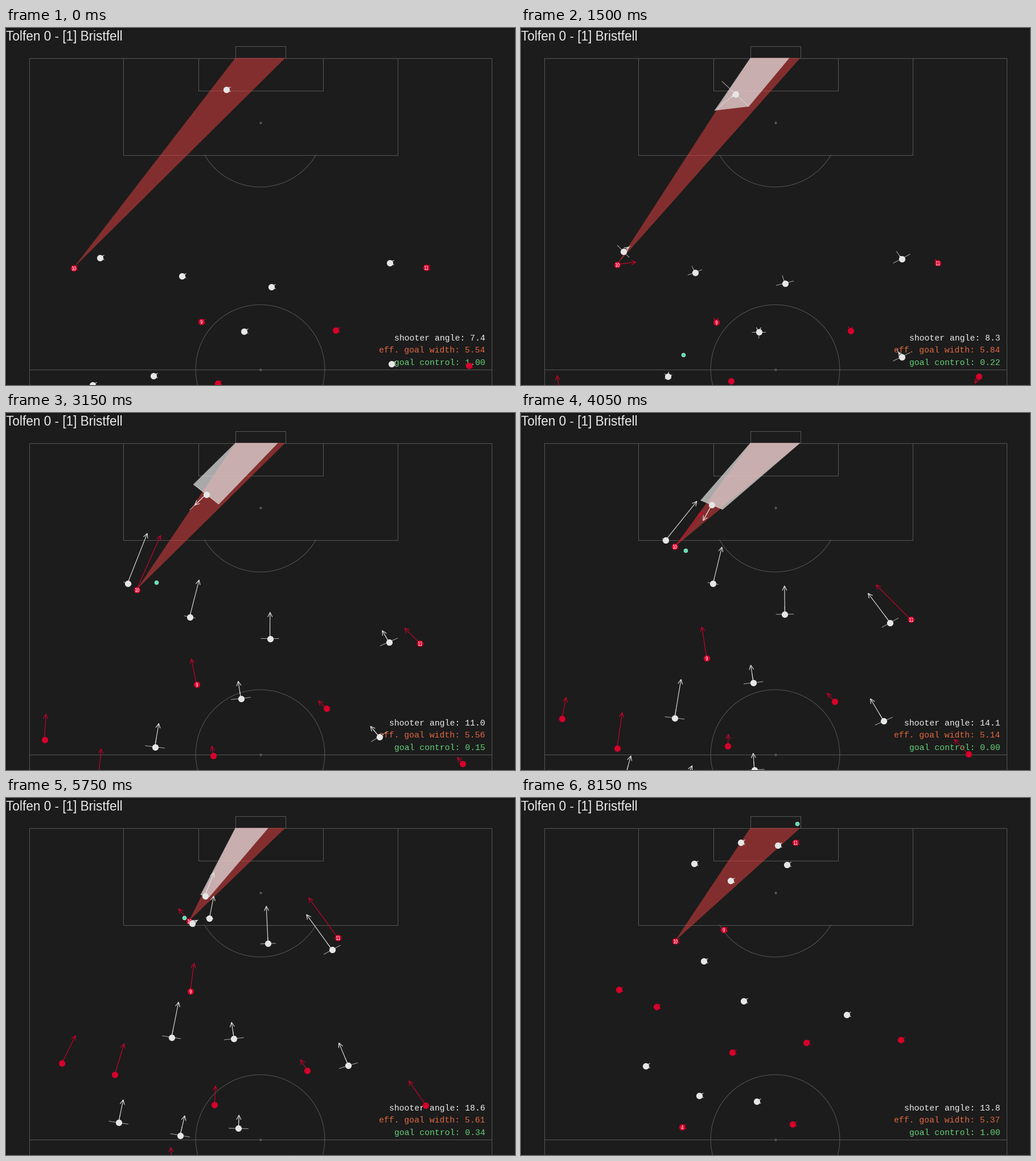
Animation, 894 px wide and 626 px high, one loop 8250 ms. Source, as a matplotlib script:

```python
from itertools import combinations

import numpy as np
import matplotlib.pyplot as plt
from matplotlib.animation import FuncAnimation
from matplotlib.collections import LineCollection, PolyCollection

W, H, DPI = 894, 626, 64
FRAMES, STEP = 165, 50
LAST = FRAMES - 2
SCALE = np.array([11.95, 10.35])      # pixels per metre, across and along
GOAL_Y, POST_L, POST_R = 53, 403.3, 491
BG, LINE = "#1c1c1c", "#565656"
RED, WHITE, BALL = "#d6002a", "#e6e6e6", "#50e3b4"

KICK = 1.5                            # the long pass; everyone drifts until then
RUN = (KICK, 3.15, 4.85, 8.15)
DUEL = (KICK, 3.15, 4.4, 4.85, 5.3, 5.75, 6.95, 8.15)


def px(n):
    return n * 72 / DPI


class Path:
    """Steady drift up to KICK, then a smooth spline through the points."""

    def __init__(self, *points, drift=(0, -1), times=RUN, label="", skill=1):
        self.p, self.t = np.array(points, float), np.array(times)
        self.drift, self.label, self.skill = np.array(drift), label, skill
        h = np.diff(self.t)
        d = np.diff(self.p, axis=0) / h[:, None]
        a, r = np.eye(len(times)), np.zeros_like(self.p)
        r[0] = -self.drift / KICK
        for k in range(1, len(h)):
            a[k, k - 1:k + 2] = h[k], 2 * (h[k - 1] + h[k]), h[k - 1]
            r[k] = 3 * (h[k] * d[k - 1] + h[k - 1] * d[k])
        a[-1, -2:] = 1, 2
        r[-1] = 3 * d[-1]
        self.m = np.linalg.solve(a, r)

    def at(self, t):
        if t < KICK:
            return self.p[0] + self.drift * (1 - t / KICK), self.m[0]
        k = min(np.searchsorted(self.t, t, side="right"), len(self.t) - 1) - 1
        h = self.t[k + 1] - self.t[k]
        u = (t - self.t[k]) / h
        p, q = self.p[k], self.p[k + 1]
        v, w = self.m[k] * h, self.m[k + 1] * h
        a, b = 2 * p - 2 * q + v + w, 3 * q - 3 * p - 2 * v - w
        return p + u * (v + u * (b + u * a)), (v + u * (2 * b + 3 * u * a)) / h


ball = Path((285, 573), (264, 297), (302, 233), (313, 226), (314, 221), (313, 210),
            (377, 131), (485, 45), drift=(20, 287), times=DUEL)
shooter = Path((169, 415), (230, 310), (288, 219), (310, 216), (324, 221), (322, 216),
               (286, 197), (271, 251), drift=(-50, 6), times=DUEL, label="10")
keeper = Path((377, 116), (352, 143), (331, 173), (327, 193), (324, 212), (327, 220),
              (329, 163), (304, 115), drift=(10, -8), times=DUEL, skill=2)
marker = Path((180, 392), (214, 299), (275, 204), (306, 192), (336, 187), (350, 172),
              (355, 122), (386, 78), drift=(-15, 11), times=DUEL)

whites = [
    keeper,
    marker,
    Path((306, 429), (323, 358), (349, 252), (368, 145), drift=(3, 6)),
    Path((464, 448), (464, 396), (463, 311), (451, 83), drift=(2, 6)),
    Path((669, 405), (673, 402), (614, 322), (467, 117), drift=(5, 7)),
    Path((669, 577), (656, 568), (619, 507), (572, 380), drift=(8, 12)),
    Path((418, 533), (413, 501), (405, 449), (391, 356)),
    Path((258, 611), (262, 586), (280, 479), (321, 286), drift=(1, -1)),
    Path((155, 650), (175, 655), (191, 605), (219, 470), drift=(-3, -24)),
    Path((250, 700), (265, 690), (296, 626), (313, 522)),
    Path((412, 668), (412, 650), (409, 603), (414, 532)),
]
reds = [
    shooter,
    Path((732, 412), (727, 404), (634, 309), (482, 78), drift=(6, 8), label="11"),
    Path((343, 516), (335, 476), (322, 386), (356, 231), label="9"),
    Path((300, 785), (299, 750), (296, 680), (283, 577), label="4"),
    Path((579, 531), (563, 518), (541, 494), (501, 429)),
    Path((804, 611), (802, 615), (764, 574), (667, 424), drift=(9, -19)),
    Path((369, 619), (364, 601), (365, 566), (371, 446), drift=(3, 4)),
    Path((70, 650), (68, 573), (81, 506), (172, 336), drift=(9, 60)),
    Path((160, 690), (163, 640), (178, 538), (238, 366), drift=(0, 10)),
    Path((530, 775), (527, 740), (520, 690), (477, 572)),
]


def limbs(pos, vel, target, skill):
    """Ends of the reach: left, right and ahead; it grows with ball distance."""
    reach = skill * min(1.46, .31 * np.sqrt(np.hypot(*((target - pos) / SCALE))))
    f = vel / SCALE
    f = f / max(np.hypot(*f), 1e-6) * reach
    side = np.array([-f[1], f[0]]) * SCALE
    ahead = f * SCALE * (1.43 if skill > 1 else 1)
    return pos - side, pos + side, pos + ahead


def cast(p, eye):
    """Where the sight line through p meets the goal line."""
    return eye[0] + (p[0] - eye[0]) * (eye[1] - GOAL_Y) / (eye[1] - p[1])


def area(quad):
    x, y = np.array(quad).T
    return abs(x @ np.roll(y, -1) - y @ np.roll(x, -1)) / 2


def shadow(pos, ends, eye):
    """Largest part of the goal view hidden by a player standing inside it."""
    near = eye[1] - 8
    if pos[1] > near or not POST_L < cast(pos, eye) < POST_R:
        return None
    quads = []
    for pair in combinations([e for e in ends if e[1] < near], 2):
        a, b = sorted(pair, key=lambda e: cast(e, eye))
        lo, hi = np.clip([cast(a, eye), cast(b, eye)], POST_L, POST_R)
        if hi - lo > .5:
            quads.append([a, (lo, GOAL_Y), (hi, GOAL_Y), b])
    return max(quads, key=area, default=None)


def open_share(quads):
    """Share of the goal mouth that no shadow covers."""
    covered, edge = 0, POST_L
    for lo, hi in sorted((q[1][0], q[2][0]) for q in quads):
        covered += max(0, hi - max(lo, edge))
        edge = max(edge, hi)
    return 1 - covered / (POST_R - POST_L)


def arrow(pos, vel):
    tip = pos + vel
    n = np.hypot(*vel)
    d = vel / n if n > .01 else np.array([-1, 0])
    side = np.array([-d[1], d[0]])
    barbs = [tip - 8 * d + 4 * s * side for s in (1, -1)]
    return [[pos, tip], [barbs[0], tip, barbs[1]]]


fig = plt.figure(figsize=(W / DPI, H / DPI), dpi=DPI, facecolor=BG)
ax = fig.add_axes([0, 0, 1, 1])
ax.set_xlim(.5, W + .5)
ax.set_ylim(H + .5, .5)
ax.axis("off")


def stroke(xs, ys, color=LINE):
    ax.plot(xs, ys, color=color, lw=px(1), zorder=1)


def box(x0, y0, x1, y1, color=LINE):
    stroke([x0, x1, x1, x0, x0], [y0, y0, y1, y1, y0], color)


def arc(cx, cy, r, a0, a1):
    a = np.linspace(a0, a1, 200)
    stroke(cx + r * np.cos(a), cy + r * np.sin(a))


box(1, 1, W, H, "#111111")
box(41, 53, 853, 1145)
box(206, 53, 688, 223)
box(338, 53, 557, 110)
box(403.5, 32, 491, 53)
stroke([41, 853], [599, 599])
arc(447, 599, 113.3, 0, 2 * np.pi)
cut = np.arcsin(57 / 113.3)
arc(447, 166, 113.3, cut, np.pi - cut)
ax.scatter([447, 447], [166, 599], s=px(4.4) ** 2, c=LINE, lw=0, zorder=1)

cone = PolyCollection([], facecolors="#d93d3d", alpha=.55, lw=0, zorder=2)
shade = PolyCollection([], facecolors=WHITE, alpha=.7, lw=0, zorder=3)
arms = LineCollection([], colors=WHITE, alpha=.7, lw=px(1), zorder=6)
red_arrows = LineCollection([], colors=RED, lw=px(1.1), zorder=6)
white_arrows = LineCollection([], colors=WHITE, lw=px(1.1), zorder=8)
for c in (cone, shade, arms, red_arrows, white_arrows):
    ax.add_collection(c, autolim=False)


def dots(size, color, z, **kw):
    return ax.scatter([], [], s=px(size) ** 2, c=color, zorder=z, **kw)


red_dots = dots(11.2, RED, 7, lw=0)
white_dots = dots(11.2, WHITE, 9, lw=0)
ball_dot = dots(6.8, BALL, 10, edgecolors="#d8f5ea", linewidths=px(.7))
numbers = [ax.text(0, 0, p.label, color="white", fontsize=px(7.6), zorder=7.5,
                   family="DejaVu Sans Mono", ha="center", va="center_baseline",
                   clip_on=True)
           for p in reds if p.label]

ax.text(1, 22.5, "Tolfen 0 - [1] Bristfell", color="#ececec", fontsize=px(22.5),
        family="Liberation Sans", va="baseline", zorder=5)


def readout(y, color):
    return ax.text(842, y, "", color=color, fontsize=px(14.77), ha="right",
                   va="baseline", family="Liberation Mono", zorder=5)


angle_text = readout(548, "#ececec")
width_text = readout(569, "#e0673f")
control_text = readout(591, "#62cf76")


def update(i):
    n = min(i, LAST)
    t = n * STEP / 1000
    still = n in (0, LAST)        # no speeds are known at either end

    def state(team):
        out = [p.at(t) for p in team]
        return [(p, v * 0) for p, v in out] if still else out

    red, white, target = state(reds), state(whites), ball.at(t)[0]
    for team, dot, arrows in ((red, red_dots, red_arrows),
                              (white, white_dots, white_arrows)):
        dot.set_offsets([p for p, _ in team])
        arrows.set_segments([s for p, v in team for s in arrow(p, v)])
    for text, (p, _) in zip(numbers, red):
        text.set_position((p[0], p[1] + .5))
    ball_dot.set_offsets([target])

    eye = red[0][0]
    cone.set_verts([[eye, (POST_L, GOAL_Y), (POST_R, GOAL_Y)]])
    lines, quads = [], []
    if not still:
        for player, (p, v) in zip(whites, white):
            left, right, ahead = ends = limbs(p, v, target, player.skill)
            lines += [[left, right], [p, ahead]]
            quad = shadow(p, ends, eye)
            if quad:
                quads.append(quad)
    arms.set_segments(lines)
    shade.set_verts(quads)

    dy = (eye[1] - GOAL_Y) / SCALE[1]
    near, far = (POST_L - eye[0]) / SCALE[0], (POST_R - eye[0]) / SCALE[0]
    angle = np.arctan2(far, dy) - np.arctan2(near, dy)
    width = 2 * np.hypot(near, dy) * np.tan(angle / 2)
    angle_text.set_text(f"shooter angle: {np.degrees(angle):.1f}")
    width_text.set_text(f"eff. goal width: {width:.2f}")
    control_text.set_text(f"goal control: {abs(open_share(quads)):.2f}")
    return []


anim = FuncAnimation(fig, update, frames=FRAMES, interval=STEP,
                     init_func=lambda: update(0), repeat=True, repeat_delay=0)
plt.show()
```
